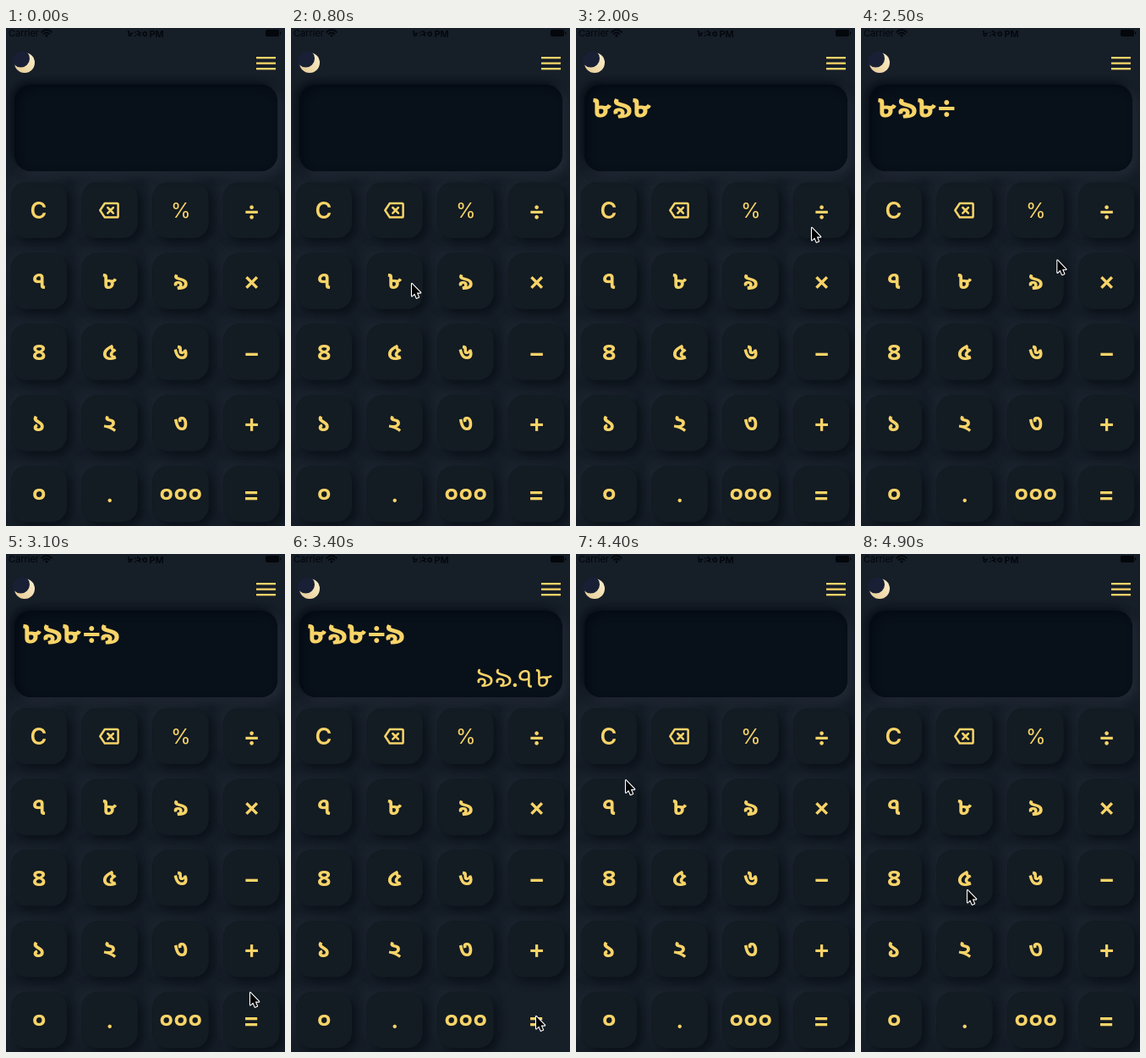
Animation, 330 px wide and 588 px high, one loop 5000 ms. Source, as an HTML page with a canvas:

```html
<!DOCTYPE html>
<html lang="bn">
<head>
<meta charset="utf-8">
<title>Calculator</title>
<style>
  html, body { margin: 0; width: 100%; height: 100%; overflow: hidden; background: #161e28; }
  canvas { display: block; width: 100vw; height: 100vh; }
</style>
</head>
<body>
<canvas id="stage" width="330" height="588"></canvas>
<script>
const ctx = document.getElementById('stage').getContext('2d');
const LOOP = 5000, STEP = 100;
const GOLD = '#f8d468', PAGE = '#161e28', KEY = '#131b23', INK = '#04070b';
const LATIN = 'Inter, "Noto Sans", sans-serif';
const BANGLA = '"Noto Sans Bengali", "Noto Sans", sans-serif';

const KEYS = ['C', '⌫', '%', '÷', '৭', '৮', '৯', '×', '৪', '৫', '৬', '−',
              '১', '২', '৩', '+', '০', '.', '০০০', '='];

// Stroke outlines for systems without a Bengali font.
const STROKES = {
  '০': 'M5 0A5 5 0 1 1 -5 0A5 5 0 1 1 5 0Z',
  '১': 'M-5 -8C-1 -7 -5 -2 -1 -2C3 -2 5 1 5 4C5 9 -3 9 -3 5C-3 3 0 3 1 5',
  '২': 'M-4 -5C-3 -9 4 -8 3 -4C2 -1 -2 0 -5 1C-1 1 2 4 4 8',
  '৩': 'M-8 -6L-5 -5C-8 9 7 9 7 -1C7 -8 -1 -8 -1 -3C-1 1 3 1 3 -2',
  '৪': 'M0 0C-6 -3 -5 -8 0 -8C5 -8 6 -3 0 0C-7 3 -6 8 0 8C6 8 7 3 0 0Z',
  '৫': 'M3 -7C-3 -8 -7 -4 -6 1C-5 8 5 8 5 2C5 -3 -2 -3 -1 2M2 -2C4 -3 6 -3 7 -4',
  '৬': 'M-4 -8C0 -8 0 -4 -4 -3C-10 0 -7 8 0 7C8 7 9 -2 4 -2C0 -2 0 3 3 3',
  '৭': 'M4 1C0 5 -6 2 -6 -3C-6 -8 0 -8 0 -4C0 -1 -3 -1 -3 -3M0 -5C1 -8 4 -7 4 -4V8',
  '৮': 'M-9 -7C-6 -8 -4 -6 -4 -3V2C-4 9 5 9 5 3C5 -2 -1 -2 -3 1M-4 -2C0 -4 4 -3 8 -3',
  '৯': 'M-7 -7C-2 -7 -6 0 -1 0C2 0 2 -4 -1 -4M-1 -4C10 -5 9 8 1 7C-3 7 -4 3 -1 3C1 3 4 5 6 8'
};

const widthOf = s => ctx.measureText(s).width;
ctx.font = '400 100px ' + BANGLA;
const hasBangla = widthOf('৮') !== widthOf('\u09FF');

// [time, x, y] of the pointer tip
const TRACK = [
  [700, 164, 345], [800, 142, 301], [950, 122, 297], [1100, 122, 297],
  [1300, 198, 295], [1400, 199, 296], [1600, 122, 297], [1700, 122, 297],
  [2000, 278, 235], [2200, 286, 220], [2300, 286, 220], [2600, 204, 300],
  [2800, 204, 300], [3100, 288, 517], [3200, 289, 545], [3400, 289, 545],
  [3600, 140, 330], [3800, 104, 261], [4100, 38, 215], [4300, 38, 215],
  [4700, 118, 420], [4900, 125, 396]
];

// [key index, pressed from, released at]
const PRESSES = [
  [5, 1000, 1150], [6, 1300, 1400], [5, 1600, 1700], [3, 2200, 2300],
  [6, 2700, 2800], [19, 3300, 3500], [0, 4200, 4300]
];

// [character, centre x, centre y, shown from]
const ENTRY = [
  ['৮', 31, 94, 1100], ['৯', 55, 95, 1400], ['৮', 78, 94, 1700],
  ['÷', 101, 95, 2300], ['৯', 123, 95, 2800]
];
const RESULT = [['৯', 229, 146], ['৯', 251, 146], ['.', 265, 154], ['৭', 277, 147], ['৮', 299, 146]];
const RESULT_AT = 3400, CLEAR_AT = 4300;

// Draws text with the centre of its ink at x, y.
function inkText(s, x, y, font, color = GOLD) {
  ctx.font = font;
  ctx.fillStyle = color;
  ctx.textAlign = 'left';
  ctx.textBaseline = 'alphabetic';
  const m = ctx.measureText(s);
  ctx.fillText(s,
    x + (m.actualBoundingBoxLeft - m.actualBoundingBoxRight) / 2,
    y + (m.actualBoundingBoxAscent - m.actualBoundingBoxDescent) / 2);
}

function trace(d, x, y, scale, width, color = GOLD) {
  ctx.save();
  ctx.translate(x, y);
  ctx.scale(scale, scale);
  ctx.lineWidth = width;
  ctx.strokeStyle = color;
  ctx.stroke(new Path2D(d));
  ctx.restore();
}

function glyph(ch, x, y, size, weight = 600, color = GOLD) {
  if (!STROKES[ch]) inkText(ch, x, y, `${weight} ${size}px ${LATIN}`, color);
  else if (hasBangla) inkText(ch, x, y, `${weight} ${size}px ${BANGLA}`, color);
  else trace(STROKES[ch], x, y, size / 28, weight > 500 ? 3 : 2, color);
}

function box(x, y, w, h, r) {
  ctx.beginPath();
  ctx.roundRect(x, y, w, h, r);
}

function shadow(color, offset, blur) {
  ctx.shadowColor = color;
  ctx.shadowOffsetX = ctx.shadowOffsetY = offset;
  ctx.shadowBlur = blur;
}

function disc(x, y, r, color) {
  ctx.fillStyle = color;
  ctx.beginPath();
  ctx.arc(x, y, r, 0, Math.PI * 2);
  ctx.fill();
}

function statusBar() {
  ctx.font = '400 11px ' + LATIN;
  ctx.fillStyle = INK;
  ctx.textAlign = 'left';
  ctx.textBaseline = 'alphabetic';
  ctx.fillText('Carrier', 3, 10);
  ctx.strokeStyle = INK;
  ctx.lineWidth = 1.8;
  for (const r of [4.5, 7.8]) {
    ctx.beginPath();
    ctx.arc(48, 10, r, -Math.PI * .77, -Math.PI * .23);
    ctx.stroke();
  }
  disc(48, 9, 1.5, INK);
  [['৮', 147], [':', 152.5], ['২', 157], ['৩', 164]]
    .forEach(([ch, x]) => glyph(ch, x, 6.5, 11, 600, INK));
  inkText('PM', 178, 6.5, '600 11px ' + LATIN, INK);
  ctx.fillStyle = INK;
  box(307, 2, 16, 8, 2);
  ctx.fill();
  ctx.fillRect(324, 4.5, 1.2, 3);
}

function header() {
  disc(20, 40, 12.5, '#192035');
  ctx.save();
  ctx.beginPath();
  ctx.rect(0, 20, 50, 45);
  ctx.arc(17.5, 36, 10.5, 0, Math.PI * 2);
  ctx.clip('evenodd');
  const g = ctx.createLinearGradient(14, 50, 34, 32);
  g.addColorStop(0, '#e9cf9b');
  g.addColorStop(1, '#fbeecb');
  disc(22, 41, 12, g);
  ctx.restore();
  ctx.fillStyle = GOLD;
  for (const y of [34, 40.5, 47]) ctx.fillRect(296, y, 23, 2.3);
}

function screen() {
  const shape = () => box(10, 67, 311, 102, 20);
  ctx.save();
  ctx.fillStyle = '#08101a';
  shadow('#262e3a', 4, 11);
  shape();
  ctx.fill();
  shadow('#080d14', -3, 8);
  shape();
  ctx.fill();
  shape();
  ctx.clip();
  shadow('#050b13', 4, 9);
  ctx.beginPath();
  ctx.rect(-30, 20, 400, 200);
  ctx.roundRect(10, 67, 311, 102, 20);
  ctx.fill('evenodd');
  ctx.restore();
}

const keyPos = i => [6 + i % 4 * 83.8, 182 + Math.floor(i / 4) * 83.8];

function keyLabel(ch, x, y) {
  if (ch === '⌫') {
    trace('M-6 -8.3H8.5Q9.8 -8.3 9.8 -7V7Q9.8 8.3 8.5 8.3H-6L-11.5 0ZM-2.5 -3.3L4.1 3.3M4.1 -3.3L-2.5 3.3', x, y, 1, 2.5);
  } else if (ch === '০০০') {
    for (const dx of [-17, 0, 17]) glyph('০', x + dx, y, 28);
  } else if (ch === 'C') inkText(ch, x - .5, y, '600 27px ' + LATIN);
  else if (ch === '%') inkText(ch, x, y, '400 24px ' + LATIN);
  else if (ch === '.') inkText(ch, x, y + 7, '600 28px ' + LATIN);
  else glyph(ch, x, y + (STROKES[ch] ? 0 : 1.8), STROKES[ch] ? 28 : 30);
}

function keypad(t) {
  const down = i => PRESSES.some(([k, a, b]) => k === i && t >= a && t < b);
  const pass = (color, offset, blur) => {
    ctx.save();
    ctx.fillStyle = KEY;
    if (color) shadow(color, offset, blur);
    KEYS.forEach((_, i) => {
      if (down(i)) return;
      box(...keyPos(i), 66, 66, 18);
      ctx.fill();
    });
    ctx.restore();
  };
  pass('#1e2631', -5, 13);
  pass('#0a1017', 5, 12);
  pass();
  KEYS.forEach((ch, i) => {
    const [x, y] = keyPos(i);
    keyLabel(ch, x + 33, y + 33.3);
  });
}

function readout(t) {
  if (t >= CLEAR_AT) return;
  for (const [ch, x, y, from] of ENTRY) {
    if (t >= from) glyph(ch, x, y, ch === '÷' ? 38 : 37);
  }
  if (t >= RESULT_AT) RESULT.forEach(([ch, x, y]) => glyph(ch, x, y, 34, 400));
}

function pointer(t) {
  if (t < TRACK[0][0]) return;
  const n = TRACK.findIndex(p => p[0] > t);
  const b = TRACK[n < 0 ? TRACK.length - 1 : n];
  const a = n < 0 ? b : TRACK[n - 1];
  const k = a === b ? 0 : (t - a[0]) / (b[0] - a[0]);
  ctx.save();
  ctx.translate(a[1] + (b[1] - a[1]) * k, a[2] + (b[2] - a[2]) * k);
  const arrow = new Path2D('M1 1V15.5L4.3 12.5L6.6 17.8L9 16.8L6.7 11.6H11.2Z');
  ctx.lineWidth = 2.2;
  ctx.strokeStyle = '#fff';
  ctx.stroke(arrow);
  ctx.fillStyle = '#000';
  ctx.fill(arrow);
  ctx.restore();
}

function draw(t) {
  ctx.fillStyle = PAGE;
  ctx.fillRect(0, 0, 330, 588);
  ctx.lineCap = ctx.lineJoin = 'round';
  keypad(t);
  screen();
  statusBar();
  header();
  readout(t);
  pointer(t);
}

const start = performance.now();
let shown = -1;
function tick() {
  const t = Math.floor((performance.now() - start) % LOOP / STEP) * STEP;
  if (t !== shown) draw(shown = t);
  requestAnimationFrame(tick);
}
tick();
</script>
</body>
</html>
```
